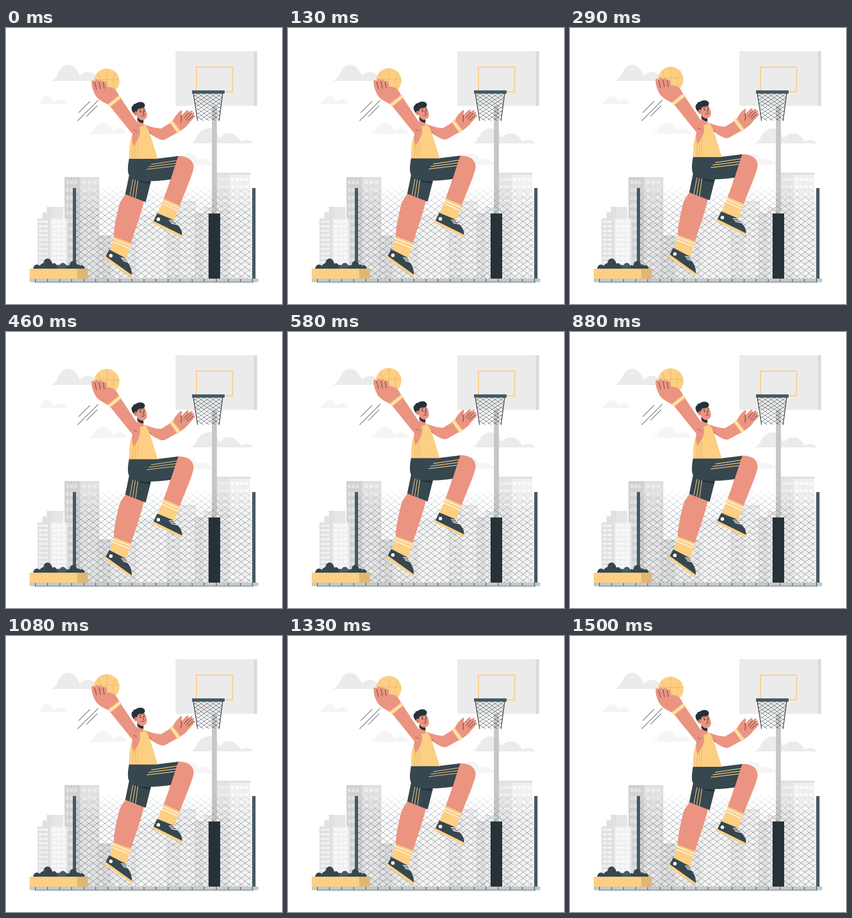
An HTML page that plays this animation: 500x500 px, repeating every 1540 ms.

```html
<!DOCTYPE html>
<html lang="en">
<head>
<meta charset="utf-8">
<title>Basketball jump</title>
<style>
  html, body { margin: 0; width: 100%; height: 100%; overflow: hidden; background: #fff; }
  svg { display: block; width: 100vw; height: 100vh; }
  .skin { fill: #eb9481; }
  .gold { fill: #fccf83; }
  .dark { fill: #37474f; }
  .ink { fill: #263238; }
  .steel { fill: #455a64; }
  .white { fill: #fff; }
  .line { fill: none; stroke: #263238; stroke-linecap: round; stroke-linejoin: round; }
  .goldline { fill: none; stroke: #fccf83; }
  .whiteline { fill: none; stroke: #fff; stroke-width: 1.3; }
  .seam { fill: none; stroke: #d9b066; stroke-width: .7; }
</style>
</head>
<body>
<svg viewBox="0 0 500 500">
  <defs>
    <clipPath id="hoopNet"><path d="M339 119H393L386 168L382 165L377 169L371 166L366 169L361 166L356 169L351 166L347 168Z"/></clipPath>
    <clipPath id="fenceArea"><path d="M127 290H446V454H127Z"/></clipPath>
    <linearGradient id="fenceInk" gradientUnits="userSpaceOnUse" x1="0" x2="0" y1="290" y2="335">
      <stop offset="0" stop-color="#37474f" stop-opacity=".15"/>
      <stop offset="1" stop-color="#37474f" stop-opacity=".85"/>
    </linearGradient>
  </defs>

  <g id="clouds">
    <g fill="#ebebeb">
      <path d="M82 96C90 93 93 84 97 77C103 66 113 64 121 69C128 73 131 82 134 87C140 80 150 77 157 82C163 85 165 91 172 96Z"/>
      <path d="M336 209C344 205 346 194 352 188C362 179 375 180 381 189C384 193 385 197 387 200C394 191 404 188 413 193C420 197 422 202 425 206C434 200 444 204 448 209Z"/>
    </g>
    <g fill="#f5f5f5">
      <path d="M56 138C62 136 64 130 67 127C73 121 82 123 86 131L89 133C94 128 101 128 104 131Q109 134 109 138Z"/>
      <path d="M149 192C157 189 159 181 164 177C174 168 187 171 192 182L194 185C200 180 210 180 214 185Q219 188 219 192Z"/>
      <path d="M306 248C314 245 316 234 322 230C332 224 343 228 347 239C354 236 365 237 368 242Q375 244 375 248Z"/>
    </g>
  </g>

  <g id="city">
    <path fill="#e0e0e0" d="M57 345H81V436H57ZM66 334H84V345H66ZM74 324H88V345H74Z"/>
    <path fill="#e6e6e6" d="M84 324H104V345H84Z"/>
    <path fill="#d1d1d1" d="M106 270H134V454H106Z"/>
    <path fill="#e0e0e0" d="M134 270H169V454H134Z"/>
    <path fill="#f0f0f0" d="M81 345H111V436H81Z"/>
    <path fill="#f1f1f1" d="M236 339H292V454H236Z"/>
    <path fill="#d8d8d8" d="M165 376H189V454H165Z"/>
    <path fill="#e8e8e8" d="M189 376H236V454H189Z"/>
    <path fill="#e3e3e3" d="M292 313H344V454H292Z"/>
    <path fill="#ebebeb" d="M313 313H344V454H313Z"/>
    <path fill="#dfdfdf" d="M341 335H364V454H341Z"/>
    <path fill="#ebebeb" d="M358 324H392V454H358Z"/>
    <path fill="#e4e4e4" d="M382 266H405V454H382Z"/>
    <path fill="#f0f0f0" d="M405 266H442V454H405Z"/>
    <path fill="#e0e0e0" d="M380 262H443V266H380Z"/>
  </g>

  <g id="hoop">
    <path fill="#c7c7c7" d="M373 141H382V337H373Z"/>
    <path fill="#ebebeb" d="M307 42H449V141H307Z"/>
    <path fill="#dbdbdb" d="M449 42H455V141H449Z"/>
    <rect class="goldline" x="345" y="71" width="65.5" height="44.5" stroke-width="2"/>
    <path id="netMesh" class="line" stroke-width=".6" clip-path="url(#hoopNet)"/>
    <path class="line" stroke-width="1.2" d="M339.5 119L347 168M392.5 119L386 168"/>
    <path class="steel" d="M337 113H396V119H337Z"/>
  </g>

  <path id="fence" fill="none" stroke="url(#fenceInk)" stroke-width=".55" clip-path="url(#fenceArea)"/>
  <path class="steel" d="M121 290H127V454H121ZM446 290H452V454H446Z"/>
  <path class="ink" d="M367 336H388V454H367Z"/>

  <g id="planter">
    <path class="steel" d="M88 437C90 429 94 428 97 430C99 424 107 424 109 430C113 428 116 432 117 437Z"/>
    <path class="dark" d="M49 437C50 429 56 426 61 431C64 427 66 426 68 426C69 415 81 414 84 427C89 424 93 429 94 437ZM108 437C109 431 113 430 115 430C116 420 126 419 129 429C131 427 134 429 134 431C138 428 142 431 143 437Z"/>
    <path class="gold" d="M43 436H129V454H43Z"/>
    <path fill="#dfb870" d="M129 436H148.500V454H129Z"/>
  </g>

  <path fill="#c7c7c7" d="M43 454H457V460.500H43Z"/>
  <path id="ticks" class="line" stroke-width="1"/>
  <path stroke="#607680" d="M52 460.500H449"/>
  <path class="line" stroke-width="1" d="M132 153L152 133M130 168L167 131M146 160L165 141"/>

  <g id="player">
    <g id="ball">
      <circle class="gold" cx="182.500" cy="96.500" r="23"/>
      <path class="seam" d="M160 93.500H205M182.500 74V119M166 81Q175 93 168 113M200 81Q190 93 197 113"/>
    </g>

    <g id="backLeg">
      <path class="skin" d="M217 300L250 312C247 329 236 361 226 391L195 380C195 360 203 330 205 321C208 311 213 307 217 300Z"/>
      <path class="gold" d="M195 378L227 390L217 418L188 405Z"/>
      <path class="whiteline" d="M194 382L225 394M193 387L223 399"/>
      <path class="dark" d="M187 401.500L217 417C217 423 229 431 228 448L180.500 414Z"/>
      <path class="gold" d="M180 413L228 447.500L227 452L177.500 417Z"/>
      <circle class="white" cx="190" cy="412.500" r="3.200"/>
      <path class="whiteline" d="M208 416.500L217 418M210 419L219 421.500M212 422L222 425"/>
      <path class="dark" d="M224 262L216 301L253 315.500L263 276Z"/>
      <path class="ink" d="M222 269Q238 279 262 278L261 282Q238 281 222 269Z"/>
      <path class="goldline" stroke-width="1.100" d="M230 274L224.500 304M234.500 275L229.500 306M239 276L234.500 308"/>
    </g>

    <g id="frontLeg">
      <path class="skin" d="M309 232C329 231 339 239 340 251C340 263 323 299 314 324L285 311C290 297 297 280 298 270Z"/>
      <path class="gold" d="M286 309L315 322L304 350L274 337Z"/>
      <path class="whiteline" d="M284.500 313.500L313 326M282.500 318L311 331"/>
      <path class="dark" d="M274 335.500L302 347C304 354 320 359 319 375.500L267 350Z"/>
      <path class="gold" d="M267 349.500L319.500 375.500L318 380L264 353Z"/>
      <circle class="white" cx="276" cy="346.500" r="3.200"/>
      <path class="whiteline" d="M295 348.500L303 348.500M297 351L306 352M299 353.500L310 356"/>
      <path class="dark" d="M223 236.500H275L312 232L299 272Q298 275 293 275C270 278 232 280 224 269C219 261 221 248 223 236.500Z"/>
      <path class="ink" d="M295 273L299 270L298 274Z"/>
      <path class="goldline" stroke-width="1.200" d="M263 247L310 240M258.500 251.500L308 245M255 256L306 250"/>
    </g>

    <g id="frontArm">
      <path class="skin" d="M249 174C260 178 270 182 281 182L299 171L313 188L288 202Q283 204 277 201C268 197 261 192 255 186Z"/>
      <path class="skin" d="M302 169C305 161 311 154 316 150C321 148 319 154 317 159L327 149.500C331 147 332 149 329 153L335 150C339 149 339 152 336 154L339 153C342 153 341 156 339 158Q343 157 342.500 160C340 164 335 168 331 173C327 179 321 183 315 187Z"/>
      <path class="line" stroke-width=".9" d="M317 158Q319 165 317 171M323 163L331 154M326 166L336 155M329 168L339 159"/>
      <path class="gold" d="M296 171L301.500 166.500L316.500 186.500L311 191.500Z"/>
      <path class="whiteline" d="M298.500 169L313.500 189.500"/>
      <path class="line" stroke-width=".6" d="M258 187L263 191"/>
    </g>

    <g id="torso">
      <path class="skin" d="M238 164H249V174L256 178V188L236 185Z"/>
      <path class="gold" d="M237 177Q244 182 251 174C257 180 259 187 261 192L275 237H223C223 217 224 208 228 196Z"/>
      <path class="seam" d="M231 212L229 236M235 209L233.500 236M239 205L238 236"/>
    </g>

    <g id="head">
      <path class="ink" d="M238 160Q241 168 249 167V172Q242 173 238 166Z"/>
      <path class="skin" d="M236 147L249 142C254 148 255 153 255.500 158C255 165 249 168 244 166C240 165 237 161 236 156Z"/>
      <path class="ink" d="M229.500 152C227 148 226 142 231 140C230 137 233 138 235 137C240 133 248 133 251 137.500C253 142 250 145 246 145.500Q240 145 238 148L237 154L234 157Q231 155 229.500 152Z"/>
      <ellipse class="skin" cx="235" cy="155" rx="3" ry="4"/>
      <path class="line" stroke-width=".9" d="M241 148.500L245 147.500M248.500 147L251 146.500M248 151.500L250 155L248 155.500M246 159Q250 160 251 157M234 153L236 156"/>
      <ellipse class="ink" cx="243.700" cy="151.500" rx="1" ry="1.400"/>
      <ellipse class="ink" cx="250.200" cy="150.500" rx=".9" ry="1.400"/>
    </g>

    <g id="raisedArm">
      <path class="skin" d="M155 98C155 94 159 94 161 97C162 92 167 92 169 97C170 93 175 94 176 98C179 94 183 98 183 107C190 106 199 109 204 121L236 169C242 177 245 186 242 194C239 203 235 209 231 214Q227 205 229 192L187 140C176 134 165 129 161 120C157 112 155 105 155 98Z"/>
      <path class="line" stroke-width=".8" d="M160.500 98L164 111M168.500 97L171 110M176 98L178 110"/>
      <path class="line" stroke-width=".6" d="M231 184L237 187"/>
      <path class="gold" d="M184 138L205 121.500L209.500 127L188.500 143.500Z"/>
      <path class="whiteline" d="M186.500 141L207 124.500"/>
    </g>
  </g>
</svg>
<script>
  const $ = id => document.getElementById(id);
  const LOOP = 1540, LIFT = 10;

  function windows(x, y, cols, rows, dx, dy, w, h, fill) {
    let d = "";
    for (let r = 0; r < rows; r++)
      for (let c = 0; c < cols; c++)
        d += `M${x + c * dx} ${y + r * dy}h${w}v${h}h${-w}z`;
    const path = document.createElementNS("http://www.w3.org/2000/svg", "path");
    path.setAttribute("d", d);
    path.setAttribute("fill", fill);
    $("city").append(path);
  }

  // Two families of mirrored diagonals
  function mesh(x0, x1, y0, y1, step, slope) {
    const run = (y1 - y0) / slope;
    let d = "";
    for (let x = x0 - run; x < x1 + run; x += step)
      d += `M${x} ${y0}l${run} ${y1 - y0}M${x} ${y0}l${-run} ${y1 - y0}`;
    return d;
  }

  windows(59.5, 349, 2, 11, 9, 8.2, 7.5, 4, "#f3f3f3");
  windows(84, 349, 3, 11, 8.5, 8.2, 6.5, 4, "#fafafa");
  windows(109, 276, 3, 12, 7, 14, 5.5, 7, "#e2e2e2");
  windows(138, 276, 3, 12, 9.5, 14, 7, 7, "#ebebeb");
  windows(168, 382, 2, 7, 10, 10.5, 8, 6, "#e4e4e4");
  windows(194, 382, 3, 7, 12, 10.5, 9, 6, "#f0f0f0");
  windows(243, 348, 4, 9, 12, 12, 8, 7, "#f8f8f8");
  windows(295, 320, 2, 11, 9, 12, 7, 7, "#f1f1f1");
  windows(317, 320, 3, 11, 9, 12, 7, 7, "#f6f6f6");
  windows(344, 342, 2, 9, 10, 12, 7, 7, "#eaeaea");
  windows(385, 272, 3, 14, 7, 13, 4.5, 5, "#f1f1f1");
  windows(408, 272, 4, 14, 8.5, 13, 5.5, 5, "#fcfcfc");

  $("fence").setAttribute("d", mesh(127, 446, 290, 454, 14.5, 0.76));
  $("netMesh").setAttribute("d", mesh(339, 393, 119, 170, 10.8, 0.66));

  let ticks = "";
  for (let i = 0; i < 19; i++) ticks += `M${53.5 + i * 21.83} 455v4`;
  $("ticks").setAttribute("d", ticks);

  // Eased rise, then a fall that settles softly
  function height(t) {
    const p = t / LOOP * 2;
    return LIFT * (p < 1 ? (1 - Math.cos(p * Math.PI)) / 2 : (2 - p) ** 1.6);
  }

  function draw() {
    $("player").setAttribute("transform", `translate(0 ${-height(performance.now() % LOOP)})`);
    requestAnimationFrame(draw);
  }
  draw();
</script>
</body>
</html>
```
